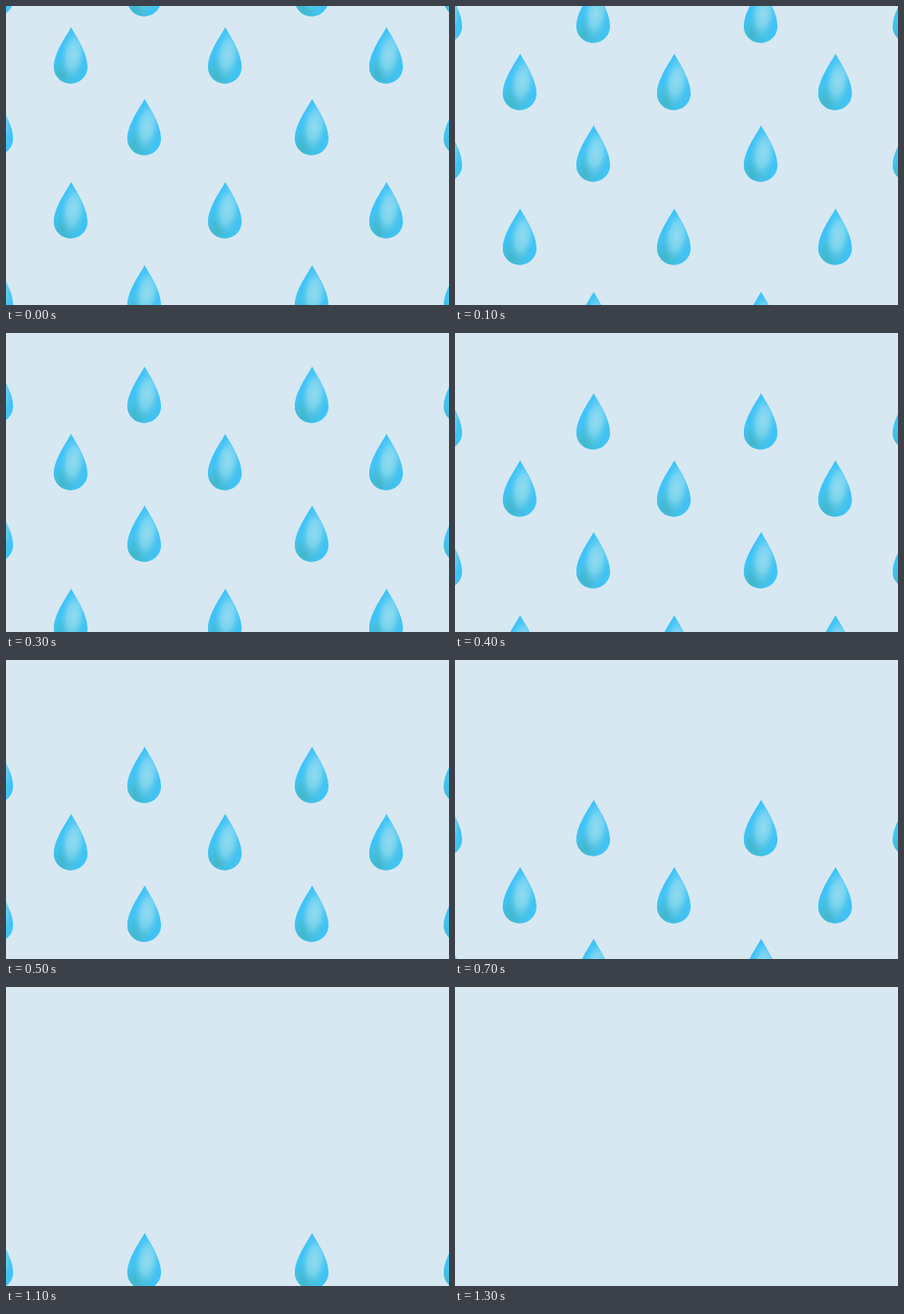
Recreate the animation shown at these times as an HTML page. Size 500 by 338 pixels, loop 1.4 s.

```html
<!DOCTYPE html>
<html lang="en">
<head>
<meta charset="utf-8">
<title>Falling drops</title>
<style>
  html, body { margin: 0; width: 100%; height: 100%; overflow: hidden; background: #d7e8f2; }
  svg { display: block; width: 100%; height: 100%; }
</style>
</head>
<body>
<svg viewBox="0 0 500 338">
  <defs>
    <radialGradient id="teal" gradientUnits="userSpaceOnUse" cx="0" cy="0" r="1"
      gradientTransform="translate(-8 54) rotate(-55) scale(36 21)">
      <stop offset="0" stop-color="#42b6cb"/>
      <stop offset=".45" stop-color="#44bcd6" stop-opacity=".8"/>
      <stop offset="1" stop-color="#4cc4e6" stop-opacity="0"/>
    </radialGradient>
    <radialGradient id="light" gradientUnits="userSpaceOnUse" cx="0" cy="0" r="1"
      gradientTransform="translate(3 31) rotate(8) scale(14.5 30)">
      <stop offset="0" stop-color="#93dbee"/>
      <stop offset=".5" stop-color="#86d8f0" stop-opacity=".8"/>
      <stop offset="1" stop-color="#5ccbf5" stop-opacity="0"/>
    </radialGradient>
    <path id="shape" d="M.5 0C7 12 19 29 19 45A19 18.7 0 0 1-19 45C-19 29-6 12 .5 0Z"/>
    <g id="drop">
      <use href="#shape" fill="#3ec3f8"/>
      <use href="#shape" fill="url(#teal)"/>
      <use href="#shape" fill="url(#light)"/>
    </g>
  </defs>
  <g id="rain"></g>
</svg>
<script>
  const LOOP = 1400, STEP = 100, FALL = 30;
  const outer = [-11, 156, 345, 513], inner = [73, 247, 429];
  const rows = [[-52, outer], [24, inner], [105, outer], [199, inner], [293, outer]];
  const rain = document.getElementById('rain');

  rain.innerHTML = rows.map(([y, xs]) =>
    xs.map(x => `<use href="#drop" x="${x}" y="${y}"/>`).join('')).join('');

  function draw() {
    const step = Math.floor(performance.now() % LOOP / STEP);
    rain.setAttribute('transform', `translate(0 ${step * FALL})`);
    requestAnimationFrame(draw);
  }
  draw();
</script>
</body>
</html>
```
